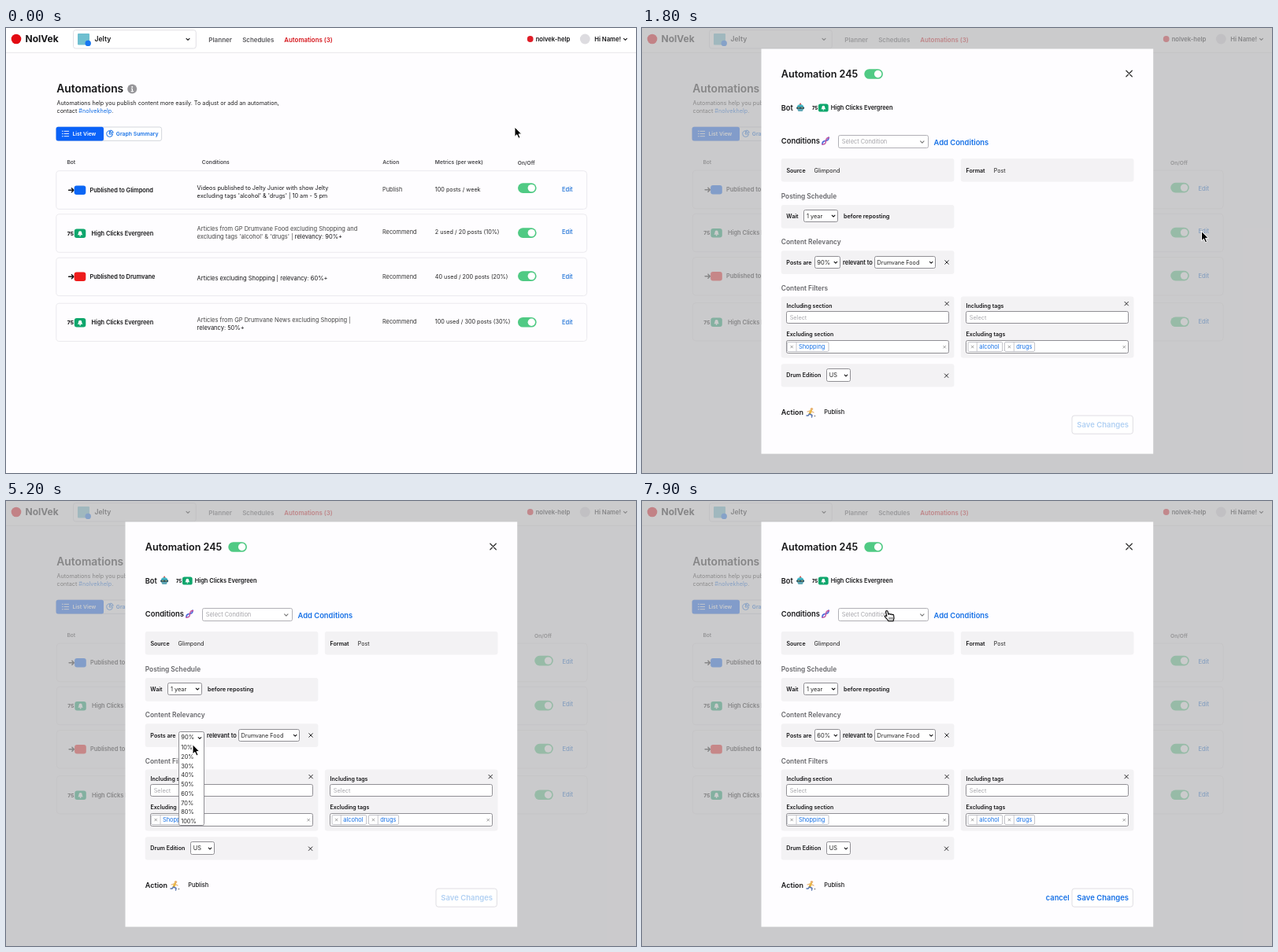
An HTML page that plays this animation: 800x566 px, repeating every 8000 ms.

```html
<!DOCTYPE html>
<html lang="en">
<head>
<meta charset="utf-8">
<title>Automations</title>
<style>
html, body { margin: 0; width: 100%; height: 100%; overflow: hidden; background: #fefdff; }
svg { display: block; width: 100vw; height: 100vh; font-family: Inter, "Open Sans", sans-serif; }
text { white-space: pre; }
</style>
</head>
<body>
<svg id="stage" viewBox="0 0 800 566"></svg>
<script>
const INK = '#161618', GREY = '#58585c', BLUE = '#1570e6', GREEN = '#50ca84';

// Drawing helpers; text is placed by its vertical centre.
const text = (x, cy, size, weight, color, str) =>
  `<text x="${x}" y="${cy + size * 0.36}" font-size="${size}" font-weight="${weight}" fill="${color}">${str}</text>`;
const box = (x1, y1, x2, y2, fill, stroke = 'none', r = 2) =>
  `<rect x="${x1}" y="${y1}" width="${x2 - x1}" height="${y2 - y1}" rx="${r}" fill="${fill}" stroke="${stroke}" stroke-width=".9"/>`;
const dot = (x, y, r, fill) => `<circle cx="${x}" cy="${y}" r="${r}" fill="${fill}"/>`;
const line = (d, color, w = 1) =>
  `<path d="${d}" fill="none" stroke="${color}" stroke-width="${w}" stroke-linecap="round" stroke-linejoin="round"/>`;
const group = (id, body) => `<g id="${id}">${body}</g>`;
const chevron = (x, y, color = INK, s = 2) => line(`M${x - s} ${y - s / 2}l${s} ${s}l${s} ${-s}`, color, 1.1);
const cross = (x, y, s, color = INK, w = 0.9) =>
  line(`M${x - s} ${y - s}l${2 * s} ${2 * s}M${x + s} ${y - s}l${-2 * s} ${2 * s}`, color, w);
const toggle = (x, cy) => box(x, cy - 6.3, x + 23.6, cy + 6.3, GREEN, 'none', 6.3) + dot(x + 17.3, cy, 4.7, '#fff');

const bellBadge = (x, cy, scale = 1) =>
  `<g transform="translate(${x} ${cy}) scale(${scale})">` +
  text(0, 0, 6.7, 800, INK, '75') + box(9, -5.7, 23.5, 5.7, '#0ea66c', 'none', 3) +
  '<path d="M13 2q1.2-1 1.2-3a2.1 2.1 0 0 1 4.2 0q0 2 1.2 3z" fill="#fff"/>' +
  dot(16.3, 2.8, 0.9, '#fff') + '</g>';
const arrowBadge = (x, cy, color) =>
  line(`M${x + 1} ${cy}h6M${x + 4.8} ${cy - 2.5}l2.5 2.5l-2.5 2.5`, INK, 1.5) +
  box(x + 8, cy - 5.7, x + 22.7, cy + 5.7, color, 'none', 3);

const header = () =>
  box(0, 0, 800, 31, '#fff', 'none', 0) + line('M0 31.4H800', '#e6e5e9', 0.9) +
  dot(13, 14, 6.3, '#e30b13') + text(24.5, 14, 12, 700, INK, 'NolVek') +
  box(85.5, 2.6, 241.3, 26, '#fff', '#dedde2', 3) +
  box(91, 7, 106, 21.5, '#6fbfd0', 'none', 1) + dot(104.2, 19.4, 3.7, '#1877f2') +
  text(112.5, 14, 8.6, 600, INK, 'Jelty') + chevron(231, 14.3) +
  text(257.2, 14.8, 8.1, 600, GREY, 'Planner') +
  text(300.2, 14.8, 7.9, 600, GREY, 'Schedules') +
  text(353.3, 14.8, 7.9, 600, '#d5151b', 'Automations (3)') +
  dot(665.7, 14, 3.9, '#e01e28') + text(672.7, 14, 7.6, 600, INK, 'nolvek-help') +
  dot(735.3, 14, 6.4, '#dddce0') + text(747.2, 14, 7.7, 600, INK, 'Hi Name!') + chevron(786.4, 14.3);

const intro = () =>
  text(64.3, 77.4, 13.8, 600, INK, 'Automations') +
  dot(160.2, 77.6, 6, '#97969a') + dot(160.2, 74.9, 1, '#fff') + line('M159.5 77.3h.9v3.3m-1.2 0h2.4', '#fff', 1.2) +
  text(64.5, 95.6, 7.25, 400, '#222', 'Automations help you publish content more easily. To adjust or add an automation,') +
  text(64.5, 105, 7.25, 400, '#222', `contact <tspan fill="${BLUE}">#nolvekhelp</tspan>.`) +
  box(63.8, 126, 197.6, 143.4, '#fff', '#d0d3da', 2.5) +
  box(63.6, 125.7, 124, 143.6, '#0a62f8', 'none', 2.5) +
  [131.3, 134.5, 137.7].map(y => dot(71.8, y, 0.7, '#fff') + line(`M74 ${y}h5.6`, '#fff', 0.9)).join('') +
  text(84.5, 134.6, 6.8, 600, '#fff', 'List View') +
  line('M131.5 130.7a3.9 3.9 0 1 0 4 4.3h-4zM133.2 130a3.6 3.6 0 0 1 3 3.2h-3z', BLUE, 1) +
  text(139.8, 134.6, 6.85, 600, BLUE, 'Graph Summary');

const dark = s => `<tspan fill="${INK}">${s}</tspan>`;
const rows = [
  { y: [181.7, 230.4], badge: 206.3, color: '#0a66f5', bot: 'Published to Glimpond', size: 7.3,
    cond: [[203, dark('Videos published to Jelty Junior with show Jelty')], [213.5, dark("excluding tags 'alcohol' &amp; 'drugs' | 10 am - 5 pm")]],
    act: [205.5, 'Publish'], use: '100 posts / week', on: 203.6, edit: 205 },
  { y: [236.8, 285.3], badge: 261.3, bot: 'High Clicks Evergreen', size: 7.5,
    cond: [[255.3, 'Articles from GP Drumvane Food excluding Shopping and'], [265.2, "excluding tags 'alcohol' &amp; 'drugs' | " + dark('relevancy: 90%+')]],
    act: [259.5, 'Recommend'], use: '2 used / 20 posts (10%)', on: 260.6, edit: 259 },
  { y: [292.2, 340.6], badge: 316.3, color: '#ee1c1c', bot: 'Published to Drumvane', size: 7.5,
    cond: [[318, dark('Articles excluding Shopping | relevancy: 60%+')]],
    act: [316, 'Recommend'], use: '40 used / 200 posts (20%)', on: 315.6, edit: 316 },
  { y: [350.2, 398.5], badge: 374.8, bot: 'High Clicks Evergreen', size: 7.5,
    cond: [[371.6, 'Articles from GP Drumvane News excluding Shopping |'], [381.3, dark('relevancy: 50%+')]],
    act: [373.2, 'Recommend'], use: '100 used / 300 posts (30%)', on: 374.2, edit: 374 }
];

const row = r =>
  box(63.8, r.y[0], 737.6, r.y[1], '#fefdff', '#e9e8ec', 4) +
  (r.color ? arrowBadge(78.6, r.badge, r.color) : bellBadge(77.8, r.badge)) +
  text(r.color ? 106.5 : 108.5, r.badge, 7.4, 600, INK, r.bot) +
  r.cond.map(([y, s]) => text(242.6, y, r.size, 400, '#444', s)).join('') +
  text(478, r.act[0], 7.35, 400, '#333', r.act[1]) +
  text(544.8, r.act[0], 7.25, 400, '#222', r.use) +
  text(706, r.edit, 7.5, 500, '#1a6fd6', 'Edit');

const table = () =>
  [[77.4, 'Bot'], [248.8, 'Conditions'], [478.3, 'Action'], [544.8, 'Metrics (per week)']]
    .map(([x, s]) => text(x, 171, 6.7, 600, '#48484c', s)).join('') +
  group('rows', rows.map(row).join('')) +
  group('switches', text(649.8, 171.6, 6.7, 600, '#48484c', 'On/Off') + rows.map(r => toggle(650, r.on)).join(''));

// Small pictograms beside the section titles.
const robot = () =>
  '<path d="M196.8 101a4.3 4 0 0 1 8.6 0z" fill="#45b5c4"/>' + box(196, 100.5, 206.2, 103, '#2d5867', 'none', 1.2) +
  '<path d="M197 103h8.2l-1.5 3h-5.2z" fill="#62a9b8"/>' + dot(201.1, 96.6, 1, '#d5544f') +
  dot(199, 101.6, 0.7, '#ffd75e') + dot(203.2, 101.6, 0.7, '#ffd75e');
const helix = () =>
  line('M229 148q-.5-4 4-4.5t4-4.5', '#4b62d8', 1.6) + line('M229 148q4.5.5 4.5-4t4-4.5', '#c9509a', 1.4) +
  line('M230 145.5l2 1.7M234.5 141l1.8 1.7', '#7fa8ee', 0.8);
const runner = () =>
  dot(215.5, 484.6, 1.7, '#e8b070') + line('M214.5 487l-1.5 3.5', '#e9b93e', 3) +
  line('M213 491l3 1.5l-.5 2.5M212.5 491l-1.5 2h-2', '#5a76b0', 1.4) +
  line('M215 487.5l3 1.5M213 487l-3 1', '#e8b070', 1.2) + dot(219.5, 493.5, 0.7, '#555');

const bold = (x, y, s, size = 7.1) => text(x, y, size, 600, INK, s);
const body = (x, y, s, size = 7.3) => text(x, y, size, 400, '#222', s);
const section = (y, s) => text(176.8, y, 8.35, 600, '#66666a', s);
const panel = (x, y1, y2) => box(x, y1, x + 219.7, y2, '#f3f2f4', 'none', 3);
const crisp = v => Math.floor(v) + 0.5;
const field = (x1, y1, x2, y2, stroke = '#85848a') => box(crisp(x1), crisp(y1), crisp(x2), crisp(y2), '#fff', stroke);
const picker = (x1, y1, x2, y2) => field(x1, y1, x2, y2) + chevron(x2 - 5.6, (y1 + y2) / 2 + 0.4, INK, 1.8);
const tag = (x1, mid, x2, s) =>
  box(x1, 399.5, x2, 411.5, '#fff', '#bcbcc2', 1.5) + line(`M${mid} 399.5v12`, '#bcbcc2', 0.8) +
  cross((x1 + mid) / 2, 405.5, 1.4, '#777', 0.7) + text(mid + 3, 405.4, 7.4, 400, BLUE, s);
const filters = (x, what) =>
  panel(x, 341.5, 419.5) + bold(x + 6.8, 353.8, 'Including ' + what, 7) + cross(x + 210.4, 350.6, 2.3) +
  field(x + 7, 360, x + 212.3, 375.5) + text(x + 11, 368, 7.3, 400, '#aaa9ae', 'Select') +
  bold(x + 6.8, 389.8, 'Excluding ' + what, 7) + field(x + 7, 397.5, x + 212.3, 413) + cross(x + 207.5, 405.7, 1.4, '#777', 0.7);

const modal = () =>
  box(151.5, 26.5, 649.2, 541.6, '#fefdff', 'none', 0) +
  text(176.8, 58, 12.6, 600, INK, 'Automation 245') + toggle(282.3, 58.5) + cross(618.6, 58, 3.7, '#333', 1.3) +
  bold(176.8, 101.2, 'Bot', 9.2) + robot() + bellBadge(216, 101.5, 0.88) + bold(239.8, 101.5, 'High Clicks Evergreen', 7.4) +
  bold(176.8, 143.5, 'Conditions', 9.4) + helix() +
  field(249.3, 136.7, 363.3, 152.8, '#a9a8ae') + text(253.8, 144.7, 7.4, 400, '#a5a4a9', 'Select Condition') + chevron(355.8, 145, '#777', 2.2) +
  text(370.5, 145.7, 9.4, 600, BLUE, 'Add Conditions') +
  panel(176.7, 166, 195.5) + bold(183.4, 181, 'Source') + body(218.5, 181, 'Glimpond') +
  panel(404.8, 166, 195.5) + bold(411.5, 181, 'Format') + body(446.8, 181, 'Post', 7.1) +
  section(213.5, 'Posting Schedule') +
  panel(176.7, 225, 254.8) + bold(183.3, 239.2, 'Wait') + picker(205.5, 231, 248.7, 246.5) + body(209, 239, '1 year') + bold(256, 239.2, 'before reposting', 7.3) +
  section(272.3, 'Content Relevancy') +
  panel(176.7, 283.3, 313) + bold(183.3, 298, 'Posts are', 7.2) +
  group('share', picker(219, 290, 251.5, 305.7) + '<text id="percent" x="222.3" y="300.7" font-size="7.5" fill="#222">90%</text>') +
  bold(255, 298, 'relevant to', 7.4) + picker(295, 290, 372.8, 305.7) + body(298.5, 298, 'Drumvane Food', 7.2) + cross(387, 298, 2.3) +
  section(330.5, 'Content Filters') +
  filters(176.7, 'section') + tag(184.3, 196, 237, 'Shopping') +
  filters(404.8, 'tags') + tag(414, 425.3, 457.7, 'alcohol') + tag(460.5, 472.3, 498.6, 'drugs') +
  panel(176.7, 427.2, 456.4) + bold(183.3, 441.7, 'Drum Edition') + picker(234.5, 433.6, 264.6, 449.6) + body(237.8, 441.7, 'US') + cross(386.6, 442.2, 2.3) +
  bold(176.8, 488.3, 'Action', 9) + runner() + text(231.3, 488.8, 7.4, 500, INK, 'Publish') +
  box(546, 493, 623.4, 516.2, '#fff', '#dcdbe0', 3) +
  group('save', '<text x="552.3" y="508.2" font-size="9.5" font-weight="600">Save Changes</text>') +
  group('cancel', text(512.8, 504.5, 9.3, 600, BLUE, 'cancel')) +
  group('menu', field(219, 293, 251.5, 412) + body(222.3, 300.2, '90%', 7.5) + chevron(246, 301.5, INK, 1.8) +
    [10, 20, 30, 40, 50, 60, 70, 80, 100].map((n, i) => body(222.3, 313.5 + i * 11.75, n + '%')).join(''));

const arrow = '<path d="M0 0V12.3L2.8 9.7L4.9 14.3L7 13.4L5 8.9H8.7Z" fill="#000" stroke="#fff" stroke-width="1" stroke-linejoin="round"/>';
const hand = '<path d="M-2.5 2.5c0-1.7 2.3-1.9 2.6-.3l.8 3.6c.3-1.2 2-1.2 2.3.1c.5-.9 2-.8 2.3.4c.7-.8 2-.4 2.1.7l.4 3.3c.1 1.4-.8 2-.9 3.9h-6.2c-.5-1.5-2.8-3.3-4.3-5.3c-.9-1.3.8-2.3 2.2-.9z" fill="#fff" stroke="#111" stroke-width="1.2" stroke-linejoin="round"/>' +
  line('M2 9.5v2.6M4 9.5v2.6M6 9.5v2.6', '#111', 0.7);

document.getElementById('stage').innerHTML =
  box(0, 0, 800, 566, '#fefdff', 'none', 0) + header() + intro() + table() +
  group('dialog', box(0, 0, 800, 566, 'rgba(182,181,183,.7)', 'none', 0) + modal()) +
  group('pointer', group('arrow', arrow) + group('hand', hand));

// Pointer moves: start, end, from, to.
const moves = [
  [0, 1500, 646, 126, 711, 259],
  [1800, 2500, 710.5, 258.5, 440, 216],
  [2700, 3200, 440, 216, 352, 206],
  [3600, 4200, 352, 206, 235, 298],
  [4700, 5600, 235, 298, 238.5, 318],
  [5600, 6300, 238.5, 318, 230, 374],
  [6300, 6500, 230, 374, 230, 373],
  [6700, 7900, 230, 373, 312, 138.5]
];
const hands = [[1500, 1800], [4100, 4400], [6200, 6800], [7800, 8000]];
const $ = id => document.getElementById(id);
const show = (id, on) => $(id).setAttribute('visibility', on ? 'inherit' : 'hidden');
const shift = (id, x, y) => $(id).setAttribute('transform', `translate(${x} ${y})`);

function draw(now) {
  const t = Math.floor(now % 8000 / 100) * 100;
  const [a, b, x1, y1, x2, y2] = moves.filter(m => m[0] <= t).pop();
  const u = Math.min(1, (t - a) / (b - a)), s = u * u * (3 - 2 * u);
  shift('pointer', x1 + (x2 - x1) * s, y1 + (y2 - y1) * s);
  const pointing = hands.some(([from, to]) => t >= from && t < to);
  show('hand', pointing);
  show('arrow', !pointing);

  const open = t >= 1800, saved = t >= 6800, menu = t >= 4400 && !saved;
  show('dialog', open);
  shift('rows', open ? 0.5 : 0, open ? -0.6 : 0);
  shift('switches', open ? 21.2 : 0, open ? -0.5 : 0);
  show('menu', open && menu);
  show('share', open && !menu);
  show('cancel', saved);
  $('save').setAttribute('fill', saved ? BLUE : '#b0d0f3');
  $('percent').textContent = saved ? '60%' : '90%';
}

function tick() {
  draw(performance.now());
  requestAnimationFrame(tick);
}
tick();
</script>
</body>
</html>
```
